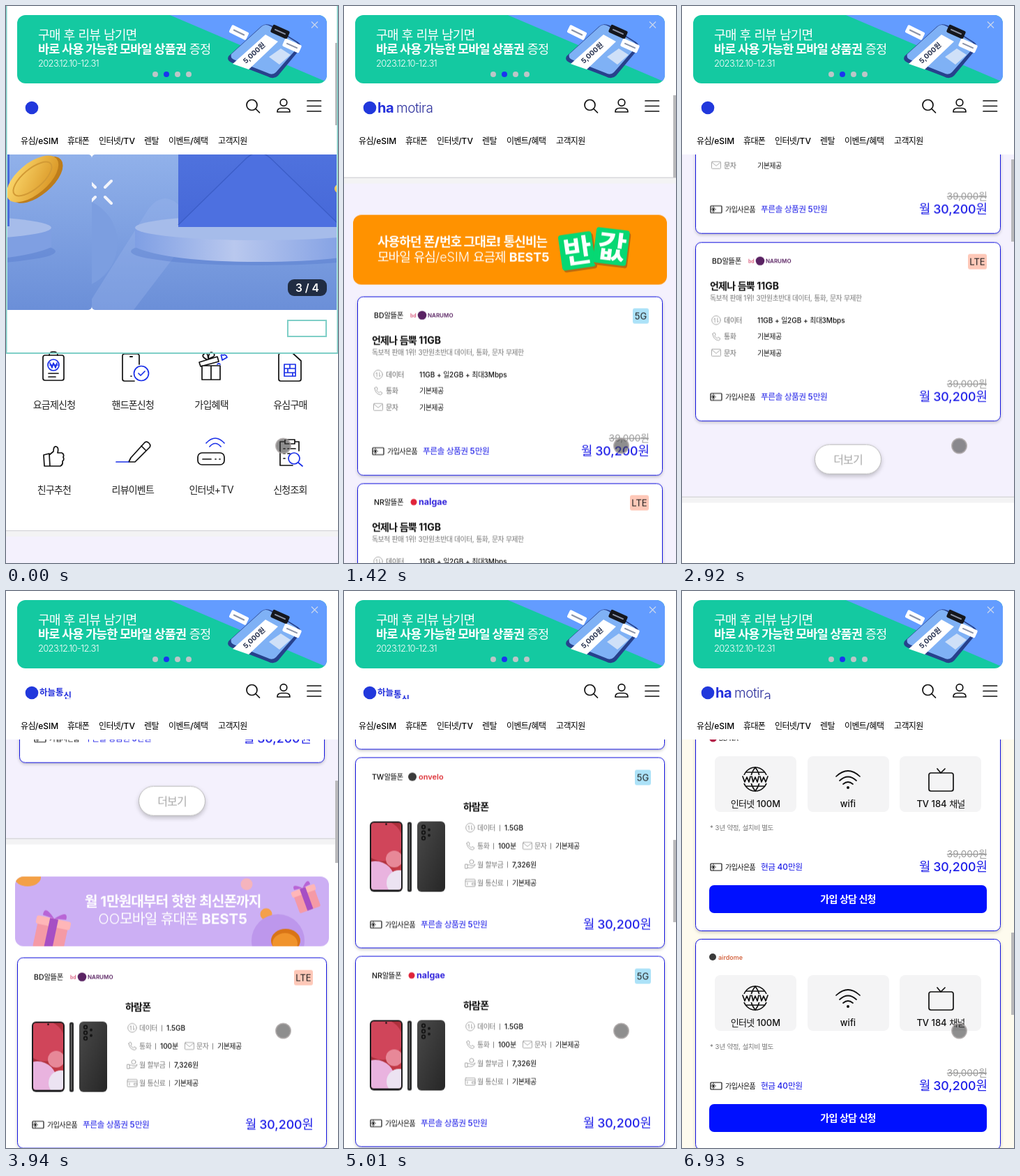
These frames come from a looping animation (476 by 799 pixels, 7 s). An HTML page:

```html
<!DOCTYPE html>
<html lang="ko">
<head>
<meta charset="utf-8">
<title>요금제 안내</title>
<style>
html, body { margin: 0; width: 100%; height: 100%; overflow: hidden; background: #fff; }
#stage { position: relative; width: 476px; height: 799px; overflow: hidden; }
svg { display: block; }
text, .word { font-family: Inter, "Noto Sans CJK KR", "Noto Sans KR", "Noto Sans CJK", sans-serif; white-space: pre; }
.k { letter-spacing: -.055em; }
.x { font-weight: 900; }
.b { font-weight: 700; }
.m { font-weight: 500; }
.s { font-weight: 600; }
.l { font-weight: 300; }
.line { fill: none; stroke: #111; stroke-width: 1.7; stroke-linecap: round; stroke-linejoin: round; }
.blue { stroke: #1a2fe8; }
.thin { fill: none; stroke: #aaa; stroke-width: 1; stroke-linecap: round; stroke-linejoin: round; }
.close { stroke: #c9d6ee; stroke-width: 1.2; }
.spark { stroke: #f2f4fb; stroke-width: 4; stroke-linecap: round; }
.card { fill: #fff; stroke: #1212e0; filter: drop-shadow(0 2px 2px rgba(0, 0, 0, .2)); }
.more { fill: #fff; stroke: #bbb; filter: drop-shadow(0 3px 3px rgba(0, 0, 0, .22)); }
.word { position: absolute; left: 48px; top: 137px; height: 18px; line-height: 18px; overflow: hidden; color: #2430dc; }
.word span { display: inline-block; }
#en { font-size: 20px; letter-spacing: -.5px; }
#en .l { color: #2b2f9c; font-size: 19px; }
#en .b + .l { margin-left: 4px; }
#ko { font-size: 12.5px; font-weight: 700; }
#page { animation: scroll 7s linear infinite; }
#thumb { animation: thumb 7s linear infinite; }
#slides { animation: slide 7s ease-out infinite; }
#frame { animation: flash 7s step-end infinite; }
#plans { animation: showPlans 7s linear infinite; }
#phones { animation: showPhones 7s linear infinite; }
#nets { animation: showNets 7s linear infinite; }
@keyframes scroll {
  0%, 1% { transform: translateY(0); }
  20.286% { transform: translateY(-506px); }
  41.714% { transform: translateY(-1121px); }
  56.286% { transform: translateY(-1470px); }
  58.286%, 61.143% { transform: translateY(-1530px); }
  71.571% { transform: translateY(-2042px); }
  85.571% { transform: translateY(-2542px); }
  99%, 100% { transform: translateY(-2934px); }
}
@keyframes thumb {
  0%, 1% { transform: translateY(53px); }
  20.286% { transform: translateY(128px); }
  41.714% { transform: translateY(220px); }
  56.286% { transform: translateY(272px); }
  58.286%, 61.143% { transform: translateY(281px); }
  71.571% { transform: translateY(357px); }
  85.571% { transform: translateY(432px); }
  99%, 100% { transform: translateY(490px); }
}
@keyframes slide {
  0%, 1% { transform: translateX(123px); }
  5%, 100% { transform: translateX(0); }
}
@keyframes flash {
  0% { visibility: visible; }
  1%, 100% { visibility: hidden; }
}
@keyframes showPlans {
  0%, 4.5% { opacity: 0; }
  11.5%, 100% { opacity: 1; }
}
@keyframes showPhones {
  0%, 43% { opacity: 0; }
  50%, 100% { opacity: 1; }
}
@keyframes showNets {
  0%, 77% { opacity: 0; }
  84%, 100% { opacity: 1; }
}
</style>
</head>
<body>
<div id="stage"></div>
<script>
const ko = s => s.replace(/[가-힣]+/g, '<tspan class="k">$&</tspan>');
const text = (x, y, size, s, cls = '', fill = '#111', more = '') =>
  `<text x="${x}" y="${y}" font-size="${size}" class="${cls}" fill="${fill}" ${more}>${ko(s)}</text>`;
const MID = 'text-anchor="middle"', END = 'text-anchor="end"';
const rect = (x, y, w, h, r, fill, more = '') =>
  `<rect x="${x}" y="${y}" width="${w}" height="${h}" rx="${r}" fill="${fill}" ${more}/>`;
const box = (x, y, w, h, r, cls) => `<rect x="${x}" y="${y}" width="${w}" height="${h}" rx="${r}" class="${cls}"/>`;
const dot = (x, y, r, fill) => `<circle cx="${x}" cy="${y}" r="${r}" fill="${fill}"/>`;
const path = (d, cls = 'line') => `<path d="${d}" class="${cls}"/>`;
const fillPath = (d, fill) => `<path d="${d}" fill="${fill}"/>`;
const at = (x, y, s, more = '') => `<g transform="translate(${x} ${y}) ${more}">${s}</g>`;
const use = (id, x, y) => `<use href="#${id}" x="${x}" y="${y}"/>`;

const BLUE = '#1c1ce8';
const brands = {
  bd: ['BD알뜰폰', text(0, 3, 7, 'bd', 's', '#d8557a') + dot(17, 0, 6.3, '#5a2363') + text(25, 3, 8, 'NARUMO', 's', '#5a2363')],
  nr: ['NR알뜰폰', dot(5, 0, 4.5, '#e0243a') + text(12, 4, 12.5, 'nalgae', 'b', '#3426dc')],
  tw: ['TW알뜰폰', dot(6, 0, 6, '#3b3b3b') + text(15, 4, 11, 'onvelo', 's', '#dd2f35')]
};

const defs = `<defs>
  <linearGradient id="sky" x2="0" y2="1"><stop stop-color="#91b1ea"/><stop offset="1" stop-color="#6b8fd8"/></linearGradient>
  <linearGradient id="stand"><stop stop-color="#7f9fe4"/><stop offset=".4" stop-color="#b9c8ee"/><stop offset="1" stop-color="#6f92e0"/></linearGradient>
  <linearGradient id="paper" x2="0" y2="1"><stop stop-color="#5073de"/><stop offset="1" stop-color="#4668d8"/></linearGradient>
  <linearGradient id="gold" x2="1" y2="1"><stop stop-color="#ffdf74"/><stop offset="1" stop-color="#d58e1c"/></linearGradient>
  <linearGradient id="red" x2="1" y2="1"><stop stop-color="#8f2330"/><stop offset="1" stop-color="#d4404c"/></linearGradient>
  <linearGradient id="back" x2="1" y2="1"><stop stop-color="#4a4a4a"/><stop offset="1" stop-color="#262626"/></linearGradient>
  <clipPath id="promo"><rect x="16" y="13" width="444" height="98" rx="12"/></clipPath>
  <clipPath id="lilac"><rect x="13" y="1880" width="450" height="100" rx="12"/></clipPath>
  <clipPath id="screen"><rect x="2" y="2" width="43" height="96" rx="4"/></clipPath>
  <clipPath id="hero"><rect x="2" y="213" width="472" height="223"/></clipPath>
  <clipPath id="pane"><rect y="213" width="476" height="223" rx="5"/></clipPath>
  <g id="data"><circle r="6.3" class="thin"/><path d="M-1.8 3V-3L-3.3-1.4M1.8-3V3L3.3 1.4" class="thin"/></g>
  <g id="call"><path d="M-5-3.6Q-3.6-6.6-1.8-5L-.8-2.2-2.4-.9Q-1 1.7 1.4 2.6L2.9 1.2 5.6 2.6Q6 5 3.4 5.8Q-4.2 4.6-5-3.6Z" class="thin"/></g>
  <g id="mail"><rect x="-6.5" y="-5" width="13" height="10" rx="1" class="thin"/><path d="M-6-4 0 1 6-4" class="thin"/></g>
  <g id="pay"><circle cx="2" cy="-3.5" r="3" class="thin"/><path d="M-7 0H-4V6H-7ZM-4 1Q-1 0 1 2H4L7 0Q8 1.6 3 5Q0 6-4 5" class="thin"/></g>
  <g id="wallet"><rect x="-7" y="-5" width="14" height="10.5" rx="1" class="thin"/><path d="M-7-2H7M3 .5H7V3H3ZM-4 0V3" class="thin"/></g>
  <g id="gift"><rect x="-8" y="-5" width="16" height="10" rx="1" fill="none" stroke="#111" stroke-width="1.2"/><path d="M-4-5V5M-8 0H0" stroke="#111" stroke-width=".8"/><path d="M-6-2.5 -4 0-2-2.5M-5.5 2.5-4 0-2.5 2.5" fill="none" stroke="#111"/></g>
  <g id="phone">
    ${rect(0, 0, 47, 101, 6, '#1d1d1f')}
    <g clip-path="url(#screen)">${rect(2, 2, 43, 96, 0, 'url(#red)')}${dot(18, 28, 29, '#d0455a')}${dot(8, 85, 28, '#e9b3df')}${dot(42, 88, 18, '#ece3f2')}${dot(35, 54, 12, '#e78898')}</g>
    ${dot(23.5, 4, 1.3, '#111')}
    ${rect(54, 1, 6, 100, 2.5, '#2c2c2d')}${rect(56, 4, 1.2, 94, 0, '#777')}
    ${rect(68, 0, 40, 101, 6, 'url(#back)')}
    ${[8, 16, 24].map(y => dot(77, y, 3.2, '#111') + dot(77, y, 1.5, '#444')).join('')}${dot(85, 12, 2, '#151515')}${dot(85, 20, 2, '#151515')}
  </g>
  <g id="coin"><ellipse cy="4" rx="17" ry="8" fill="#c98a1e"/><ellipse rx="17" ry="8" fill="url(#gold)"/><ellipse rx="12" ry="5" fill="none" stroke="#d49a2c"/></g>
  <g id="present">${rect(-22, -14, 44, 40, 3, '#f59aa6')}${rect(-25, -20, 50, 12, 3, '#ffb6b8')}${rect(-6, -20, 12, 46, 0, '#a64fc4')}
    <path d="M0-20Q-18-38-17-22ZM0-20Q18-38 17-22Z" fill="#b965d6"/></g>
  <g id="tiles">
    ${[47, 180, 312].map(x => rect(x, 52, 117, 80, 8, '#f4f4f5')).join('')}
    <circle cx="105" cy="85" r="17" class="line"/><path d="M105 68Q92 85 105 102Q118 85 105 68M92 75H118M92 95H118" class="line"/>
    ${rect(84, 79, 42, 12, 0, '#f4f4f5')}<path d="M87 81 90 89 93 82 96 89 98 81M100 81 102 89 105 82 108 89 110 81M112 81 114 89 117 82 120 89 123 81" class="line"/>
    <path d="M221 81Q238 65 255 81M226 87Q238 76 250 87M231 92Q238 86 245 92" class="line"/>${dot(238, 97, 2, '#111')}
    <rect x="354" y="76" width="35" height="26" rx="3" class="line"/><path d="M366 70 371 76 377 70" class="line"/>
  </g>
</defs>`;

function hero() {
  const spark = path('M0 0l-9-9M14 0l9-9M0 14l-9 9M14 14l9 9', 'spark');
  const stand = `<ellipse cx="240" cy="352" rx="184" ry="20" fill="#4f74c8" opacity=".35"/>
    <path d="M62 318V346Q110 367 240 367T418 346V318Z" fill="url(#stand)"/><ellipse cx="240" cy="318" rx="178" ry="18" fill="#a6bcea"/>`;
  const pane = inner => `<g clip-path="url(#pane)">${rect(0, 213, 476, 223, 0, 'url(#sky)')}${inner}</g>`;
  const left = pane(stand.replace(/url\(#stand\)/, '#7f9fe2') + rect(250, 213, 108, 103, 0, '#4a6cda').replace('x="250"', 'x="250"')
    + at(391, 248, `<ellipse cx="4" cy="5" rx="45" ry="22" fill="#bd7d1b"/><ellipse rx="45" ry="22" fill="url(#gold)"/><ellipse rx="34" ry="14" fill="none" stroke="#d29a35" stroke-width="2"/>`, 'rotate(-40)'));
  const right = pane(`${dot(-28, 340, 65, '#7c9ee0')}<path d="M-10 436 82 290Q105 262 129 290L150 318 60 436Z" fill="#9ab6ea" opacity=".35"/>${stand}
    ${rect(124, 200, 231, 117, 5, 'url(#paper)')}<path d="M124 314 222 218Q239 203 256 218L355 314V317H124Z" fill="#4d70e0"/>
    <path d="M124 314 222 218Q239 203 256 218L355 314" fill="none" stroke="#3c5ec8" stroke-width="1.5"/>`
    + at(5, 260, spark) + at(362, 262, '<ellipse rx="14" ry="9" fill="url(#gold)"/>'));
  return `<g clip-path="url(#hero)"><g id="slides"><g transform="translate(-476 0)">${left}</g>${right}</g></g>`
    + rect(404, 392, 56, 24, 9, '#202c42') + text(432, 410, 15.5, '3 / 4', 's', '#fff', MID);
}

function menu() {
  const names = ['요금제신청', '핸드폰신청', '가입혜택', '유심구매', '친구추천', '리뷰이벤트', '인터넷+TV', '신청조회'];
  const labels = names.map((n, i) => text(69 + i % 4 * 112.8, i < 4 ? 577 : 699, 14, n, '', '#222', MID)).join('');
  const icons = box(53, 501, 30, 36, 3, 'line') + path('M62 501Q62 496 68 496T74 501M61 527H75M61 532H71')
    + '<circle cx="68" cy="515" r="8" class="line blue"/>' + path('M63 512 66 519 68 512 71 519 73 512M63 515H74', 'line blue')
    + path('M191 514V502Q191 499 188 499H170Q167 499 167 502V535Q167 538 170 538H184M179 531H180')
    + rect(177, 502, 5, 2, 1, '#111') + '<circle cx="194" cy="527" r="10.5" class="line blue"/>' + path('M190 527 193 530 199 524', 'line blue')
    + path('M281 516H307V536H281ZM294 516V536M277 511 303 503 305 510 279 517ZM288 507Q279 503 284 499T290 506Q291 494 297 498T290 506')
    + path('M309 503Q307 499 311 501Q315 499 317 504L310 508ZM303 514Q305 512 307 514', 'line blue')
    + path('M394 498H411L423 509V535Q423 538 420 538H394Q391 538 391 535V501Q391 498 394 498Z')
    + path('M399 514H415V531H399ZM399 520H415M399 526H415M407 514V520M404 520V526M411 526V531', 'line blue')
    + path('M54 644 62 642 63 660 55 660ZM62 644 68 639Q68 631 72 632T74 641H80Q84 643 82 647Q84 651 81 653Q82 658 78 660H63')
    + path('M179 648 199 626Q202 624 205 627T206 633L185 654H176ZM194 631 200 637') + path('M158 654H176', 'line blue')
    + box(275, 641, 38, 17, 6, 'line') + path('M282 650H294M300 650H301M306 650H307') + path('M287 627Q300 613 313 627M292 632Q300 623 308 632', 'line blue')
    + path('M400 625H393V659H411M414 625H420V638M400 622H414V628H400ZM398 635H400M404 635H415M398 642H400M404 642H407M398 649H400')
    + '<circle cx="413" cy="649" r="8" class="line blue"/>' + path('M419 655 425 660', 'line blue');
  return icons + labels;
}

const gap = y => rect(0, y, 476, 9, 0, '#f3f3f4') + rect(0, y, 476, 1.3, 0, '#d6d6da');
const badge = (right, y, tag) => {
  const w = tag === '5G' ? 23 : 27;
  return rect(right - w, y, w, 22, 3, tag === '5G' ? '#ace2f8' : '#fec8b8') + text(right - w / 2, y + 15.6, 13, tag, '', '#222', MID);
};
const more = y => box(190.5, y, 95, 42, 21, 'more') + text(238, y + 27, 16, '더보기', '', '#aaa', MID);
const bonus = (x, y, s) => use('gift', x + 9, y) + text(x + 22, y + 4, 10, '가입사은품', 'm') + text(x + 73, y + 4, 11.8, s, 'm', BLUE);
const price = (x, y) => text(x, y, 17.8, '월 30,200원', 'm', BLUE, END);
const oldPrice = y => text(437, y, 13.5, '39,000원', '', '#999', END + ' text-decoration="line-through"');
const label = (x, y, key) => text(x, y + 4, 10.5, brands[key][0], 'm') + at(x + 52, y, brands[key][1]);
const VOUCHER = '푸른솔 상품권 5만원';

const planCard = (y, key, tag) => at(0, y, box(19.5, -.5, 437, 256, 8, 'card') + label(43, 26, key) + badge(437, 16, tag)
  + text(40, 67, 14, '언제나 듬뿍 11GB', 'b')
  + text(40, 83, 9.9, '독보적 판매 1위! 3만원초반대 데이터, 통화, 문자 무제한', '', '#777')
  + [['data', '데이터', '11GB + 일2GB + 최대3Mbps'], ['call', '통화', '기본제공'], ['mail', '문자', '기본제공']].map(([id, a, b], i) => {
    const r = 111 + i * 23.3;
    return use(id, 49, r) + text(60, r + 4, 10, a, '', '#666') + text(108, r + 4, 10, b, 'm');
  }).join('')
  + bonus(40, 221, VOUCHER) + oldPrice(207) + price(437, 227));

const field = (x, y, id, a, bar, b) => use(id, x, y) + text(x + 10, y + 4, 10, a, '', '#777')
  + rect(bar, y - 4, 1, 9, 0, '#888') + text(bar + 7, y + 4, 10, b, 'm');
const phoneCard = (y, key, tag) => at(0, y, box(16.5, -.5, 443, 273, 8, 'card') + label(40, 27, key) + badge(440, 17, tag)
  + use('phone', 37, 91) + text(171, 75, 14, '하람폰', 'b')
  + field(181, 100, 'data', '데이터', 223, '1.5GB') + field(181, 126, 'call', '통화', 214, '100분')
  + field(263, 126, 'mail', '문자', 296, '기본제공') + field(181, 152.5, 'pay', '월 할부금', 234, '7,326원')
  + field(181, 179, 'wallet', '월 통신료', 234, '기본제공')
  + bonus(37, 239, VOUCHER) + price(440, 245));

const netCard = (y, logo) => at(0, y, box(19.5, .5, 437, 302, 8, 'card') + logo + use('tiles', 0, 0)
  + text(105.5, 125, 13, '인터넷 100M', 'm', '#111', MID) + text(238, 125, 13, 'wifi', 'm', '#111', MID) + text(371, 125, 13, 'TV 184 채널', 'm', '#111', MID)
  + text(40, 158, 9.6, '* 3년 약정, 설치비 별도', '', '#777')
  + bonus(40, 211, '현금 40만원') + oldPrice(197) + price(437, 217)
  + rect(39, 237, 398, 40, 7, '#0010ff') + text(238, 262, 14, '가입 상담 신청', 'b', '#fff', MID));

const section = (id, back, content) => `${back}<g id="${id}">${content}</g>`;

function plans() {
  const stamp = (x, y, s, a) => at(x, y, rect(-23, -24, 48, 51, 4, '#b96a10') + rect(-25, -27, 48, 51, 4, '#06d873')
    + text(-1, 15, 45, s, 'x', '#fff', MID), `rotate(${a})`);
  return section('plans', rect(0, 760, 476, 1066, 0, '#f4f1fd') + gap(752), rect(13, 806, 450, 100, 12, '#ff9200')
    + text(48, 851, 18, '사용하던 폰/번호 그대로! 통신비는', 'x', '#fff')
    + text(48, 873, 18, '모바일 유심/eSIM 요금제 <tspan class="b">BEST5</tspan>', 'l', '#fff')
    + stamp(335, 859, '반', -8) + stamp(384, 853, '값', 7)
    + planCard(924, 'bd', '5G') + planCard(1192, 'nr', 'LTE') + planCard(1461, 'bd', 'LTE') + more(1750.5));
}

function phones() {
  const party = dot(345, 1891, 8.5, '#f5b4bd') + dot(373, 1934, 8.5, '#f4a04c') + dot(390, 1972, 38, '#bd97ec')
    + '<ellipse cx="31" cy="1881" rx="19" ry="13" fill="#f3a046"/><ellipse cx="401" cy="1972" rx="21" ry="17" fill="#d97416"/><ellipse cx="400" cy="1976" rx="18" ry="15" fill="#f0932b"/>'
    + at(65, 1960, use('present', 0, 0), 'rotate(12)') + at(430, 1910, use('present', 0, 0), 'rotate(-20) scale(.72)');
  return section('phones', gap(1825), rect(13, 1880, 450, 100, 12, '#ccaff4') + `<g clip-path="url(#lilac)">${party}</g>`
    + text(239, 1923, 20.4, '월 1만원대부터 핫한 최신폰까지', 'b', '#fff', MID)
    + text(239, 1948, 20.4, 'OO모바일 휴대폰 <tspan class="b">BEST5</tspan>', 'l', '#fff', MID)
    + phoneCard(1997, 'bd', 'LTE') + phoneCard(2282, 'tw', '5G') + phoneCard(2567, 'nr', '5G') + more(2872.5));
}

function nets() {
  const stack = (x, y, n) => Array.from({ length: n }, (_, i) => use('coin', x, y - i * 9)).join('');
  const parcel = rect(378, 3043, 39, 36, 3, '#9fd3f7') + rect(375, 3036, 44, 10, 3, '#bde3fc') + rect(393, 3036, 8, 43, 0, '#f6f8ff')
    + fillPath('M397 3036Q382 3022 382 3036ZM397 3036Q412 3022 412 3036Z', '#e3edff');
  return section('nets', rect(0, 2955, 476, 900, 0, '#fefbee') + gap(2948), rect(13, 3003, 450, 100, 12, '#fcebcd')
    + text(55, 3046, 23.7, '실속 있는 <tspan class="b" fill="#1c1ca4">나만의 요금제를</tspan>', 'l', '#8467ea') + text(55, 3073, 23.7, '찾아보세요', 'l', '#8467ea')
    + stack(344, 3076, 4) + stack(378, 3070, 6) + parcel + stack(374, 3080, 2)
    + at(327, 3070, '<ellipse cx="2" cy="3" rx="17" ry="14" fill="#c98a1e"/><ellipse rx="17" ry="14" fill="url(#gold)"/><ellipse rx="11" ry="9" fill="none" stroke="#d49a2c"/>', 'rotate(-25)')
    + netCard(3119, dot(44.5, 26, 5.5, '#b32349') + text(53, 29.5, 9, 'BD NA', 's', '#555'))
    + netCard(3433, dot(44, 26, 5, '#3b3b3b') + text(52, 29.5, 9, 'airdome', 'm', '#d0562f')));
}

function header() {
  const tag = (x, y, w, h, fill, a) => at(x, y, rect(-w / 2, -h / 2, w, h, 2, fill) + rect(-w / 3, -1, w / 1.5, 2, 1, '#8a93a8'), `rotate(${a})`);
  const art = fillPath('M319 72 366 29Q372 24 381 28L419 52Q426 57 419 65L390 100Q384 106 375 101L323 81Q316 78 319 72Z', '#27418c')
    + fillPath('M323 69 367 29Q372 25 379 29L416 52Q421 56 416 62L387 95Q382 100 375 96L327 77Q321 74 323 69Z', '#7fb1f5')
    + fillPath('M325 83 372 41 390 51 348 91Z', '#fff') + fillPath('M377 73 394 61 408 70 392 84Z', '#cfe0f8')
    + at(344, 83, text(0, 0, 10, '5,000원', 'b', '#26314f'), 'rotate(-43)')
    + tag(334, 38, 27, 12, '#fff', 26) + tag(393, 37, 26, 12, '#15171d', 24) + tag(410, 57, 26, 12, '#fff', 24);
  const nav = [[21, '유심/eSIM'], [88, '휴대폰'], [133, '인터넷/TV'], [198, '렌탈'], [233, '이벤트/혜택'], [304, '고객지원']];
  return rect(0, 0, 476, 213, 0, '#fff')
    + `<g clip-path="url(#promo)">${rect(16, 13, 444, 98, 0, '#14c9a1')}${fillPath('M235 13H460V109Z', '#639cff')}${art}</g>`
    + text(46, 48, 18.2, '구매 후 리뷰 남기면', 'l', '#fff')
    + text(46, 67.5, 17.6, '<tspan class="x">바로 사용 가능한 모바일 상품권</tspan> 증정', 'l', '#fff')
    + text(46, 87, 13, '2023.12.10-12.31', 'l', '#fff', 'letter-spacing="-.7"')
    + [214, 230, 246, 262].map((x, i) => dot(x, 98, 4, i === 1 ? '#1a35f0' : '#bcc6c8')).join('')
    + path('M438 22.5 447 31.5M447 22.5 438 31.5', 'close')
    + dot(37, 146, 9.3, '#2138dc')
    + '<circle cx="352.5" cy="142" r="7.5" class="line"/>' + path('M358 147.5 363.5 153')
    + '<circle cx="398" cy="138.5" r="4.8" class="line"/>' + path('M389 152Q389 146.5 395 146.5H401Q407 146.5 407 152Z')
    + path('M432 136H451.5M432 143.5H451.5M432 151H451.5')
    + nav.map(([x, s]) => text(x, 198, 12, s, 'm', '#000')).join('');
}

const touch = '<circle cx="397.5" cy="631" r="10.5" fill="rgba(60,60,60,.58)" stroke="rgba(165,160,160,.75)" stroke-width="2"/>';
const teal = 'stroke="#7fcfc7" stroke-width="2"';
const outline = `<g id="frame">${rect(.5, -1, 475, 499, 0, 'none', teal)}${rect(404, 451, 55, 23, 0, 'none', teal)}</g>`;

const stage = document.getElementById('stage');
stage.innerHTML = `<svg width="476" height="799" viewBox="0 0 476 799">${defs}
  <g id="page">${hero()}${menu()}${plans()}${phones()}${nets()}</g>${header()}
  <g id="thumb">${rect(472, 0, 4, 118, 0, '#b9b9bb')}</g>${touch}${outline}</svg>
  <div class="word" id="en"></div><div class="word" id="ko"></div>`;

// Letters rise one by one and sink again in reverse order.
const LOOP = 7000, DROP = 19;
function letters(id, word, step, rise, shows, cls = () => '') {
  const chars = [...word];
  chars.forEach((c, i) => {
    const el = document.createElement('span');
    el.textContent = c;
    el.className = cls(i);
    document.getElementById(id).append(el);
    const key = (t, y) => ({ offset: Math.min(1, t / LOOP), transform: `translateY(${y}px)` });
    const keys = [key(0, DROP)];
    let last = DROP;
    for (const [start, end] of shows) {
      const a = start + i * step, b = end + (chars.length - 1 - i) * step;
      keys.push(key(a, DROP), key(a + rise, 0));
      last = 0;
      if (end < LOOP) {
        keys.push(key(b, 0), key(b + rise, DROP));
        last = DROP;
      }
    }
    keys.push(key(LOOP, last));
    el.animate(keys, { duration: LOOP, iterations: Infinity });
  });
}
letters('en', 'hamotira', 80, 250, [[250, 2050], [6180, LOOP]], i => i < 2 ? 'b' : 'l');
letters('ko', '하늘통신', 140, 400, [[3230, 4810]]);
</script>
</body>
</html>
```
